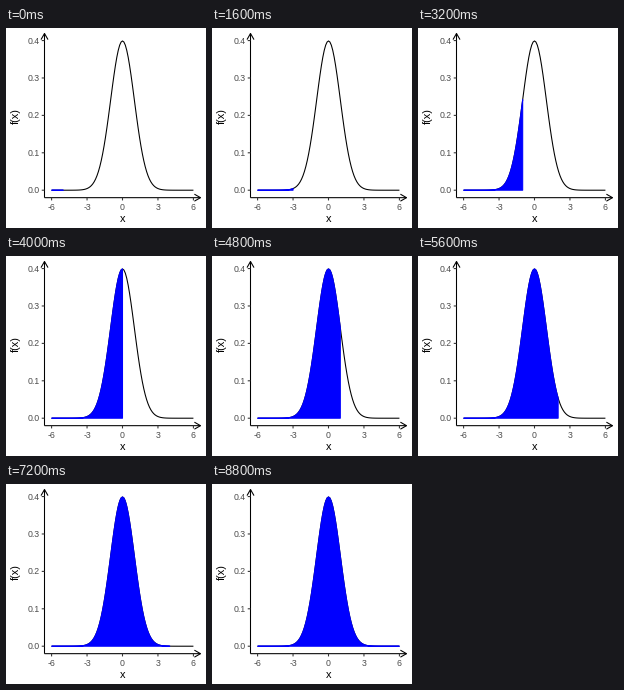
These frames come from a looping animation (200x200 px, 9.6 s). A matplotlib script:

```python
import numpy as np
import matplotlib.pyplot as plt
from matplotlib.animation import FuncAnimation

SIZE, DPI = 200, 100
PT = 72 / DPI                      # one pixel in points
LEFT, RIGHT, TOP, BOTTOM = 38.5, 194.5, 5.5, 169.67
LINE = 1.07 * PT
PEAK = 1 / np.sqrt(2 * np.pi)

plt.rcParams["font.family"] = "Liberation Sans"
plt.rcParams["path.snap"] = False


def density(x):
    return PEAK * np.exp(-x ** 2 / 2)


def to_x(x):
    return (LEFT + RIGHT) / 2 + x * (RIGHT - LEFT) / 13.2


def to_y(y):
    height = BOTTOM - TOP
    return BOTTOM - height / 22 - y / PEAK * height / 1.1


fig = plt.figure(figsize=(SIZE / DPI, SIZE / DPI), dpi=DPI, facecolor="white")
ax = fig.add_axes([0, 0, 1, 1])
ax.set(xlim=(0, SIZE), ylim=(SIZE, 0))
ax.axis("off")


def stroke(xs, ys, color="black", join="round"):
    ax.plot(xs, ys, color=color, lw=LINE, solid_capstyle="butt",
            solid_joinstyle=join)


def label(x, y, text, size, color, **kw):
    ax.text(x, y, text, fontsize=size * PT, color=color, **kw)


# Axes with open arrowheads
head, half = 6.1, 3.5
stroke([LEFT, LEFT], [BOTTOM, TOP])
stroke([LEFT, RIGHT], [BOTTOM, BOTTOM])
stroke([LEFT - half, LEFT, LEFT + half], [TOP + head, TOP, TOP + head])
stroke([RIGHT - head, RIGHT, RIGHT - head],
       [BOTTOM - half, BOTTOM, BOTTOM + half])

GREY = "#4d4d4d"
for v in (-6, -3, 0, 3, 6):
    stroke([to_x(v)] * 2, [BOTTOM, BOTTOM + 2.75], "#333333")
    label(to_x(v), 182, str(v), 8.8, GREY, ha="center", va="baseline")
for v in (0, 0.1, 0.2, 0.3, 0.4):
    stroke([LEFT - 2.75, LEFT], [to_y(v)] * 2, "#333333")
    label(LEFT - 4.95, to_y(v) + 3.1, f"{v:.1f}", 8.8, GREY,
          ha="right", va="baseline")

label((LEFT + RIGHT) / 2, 194, "x", 11, "black", ha="center", va="baseline")
label(13.3, (TOP + BOTTOM) / 2, "f(x)", 11, "black", ha="center",
      va="baseline", rotation=90, rotation_mode="anchor")

grid = np.linspace(-6, 6, 101)
stroke(to_x(grid), to_y(density(grid)))
area = plt.Polygon([[0, 0]], closed=True, facecolor="blue", edgecolor="blue",
                   lw=LINE, joinstyle="round", zorder=3)
ax.add_patch(area)


def update(step):
    """Shade the area under the curve from -6 to step - 5."""
    x = np.linspace(-6, step - 5, 101)
    curve = np.column_stack([to_x(x), to_y(density(x))])
    base = [[to_x(x[-1]), to_y(0)], [to_x(-6), to_y(0)]]
    area.set_xy(np.vstack([curve, base]))
    return [area]


anim = FuncAnimation(fig, update, frames=12, interval=800, repeat=True,
                     repeat_delay=0)
plt.show()
```
